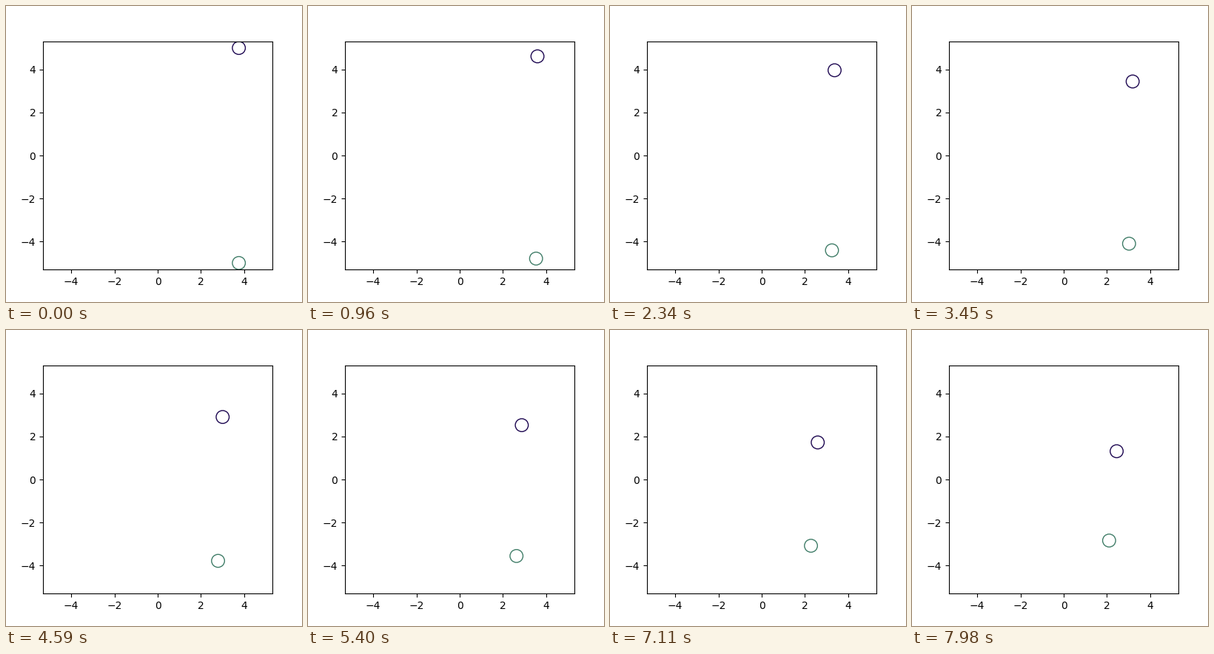
Recreate the animation shown at these times as a matplotlib script. Size 400 by 400 pixels, loop 8000 ms.

```python
import numpy as np
import matplotlib.pyplot as plt
from matplotlib.animation import FuncAnimation
from matplotlib.patches import Circle

STEPS = 267
INTERVAL = 30
RADIUS = 0.3
LIMIT = 5.3


def settle(n, tau):
    """Rises from 0 to 1 over a few multiples of tau steps."""
    return 1 - np.exp(-n / tau)


def upper_pos(n):
    x = 3.75 - 0.004897 * n
    y = 5 - 0.01409 * (n - 4.4 * settle(n, 4.4))
    return x, y


def lower_pos(n):
    x = 3.75 - 0.006104 * n - 0.0274 * settle(n, 10)
    y = -5 + 0.00836 * (n - 7.6 * settle(n, 7.6))
    return x, y


fig, ax = plt.subplots(figsize=(4, 4), dpi=100)
ax.set_xlim(-LIMIT, LIMIT)
ax.set_ylim(-LIMIT, LIMIT)

upper = Circle(upper_pos(0), RADIUS, fill=False, ec="#1c0650", lw=1)
lower = Circle(lower_pos(0), RADIUS, fill=False, ec="#407d68", lw=1)
for ball in (upper, lower):
    ax.add_patch(ball)


def update(n):
    upper.center = upper_pos(n)
    lower.center = lower_pos(n)
    return upper, lower


anim = FuncAnimation(fig, update, frames=STEPS, interval=INTERVAL,
                     init_func=lambda: update(0), repeat=True, repeat_delay=0)
plt.show()
```
